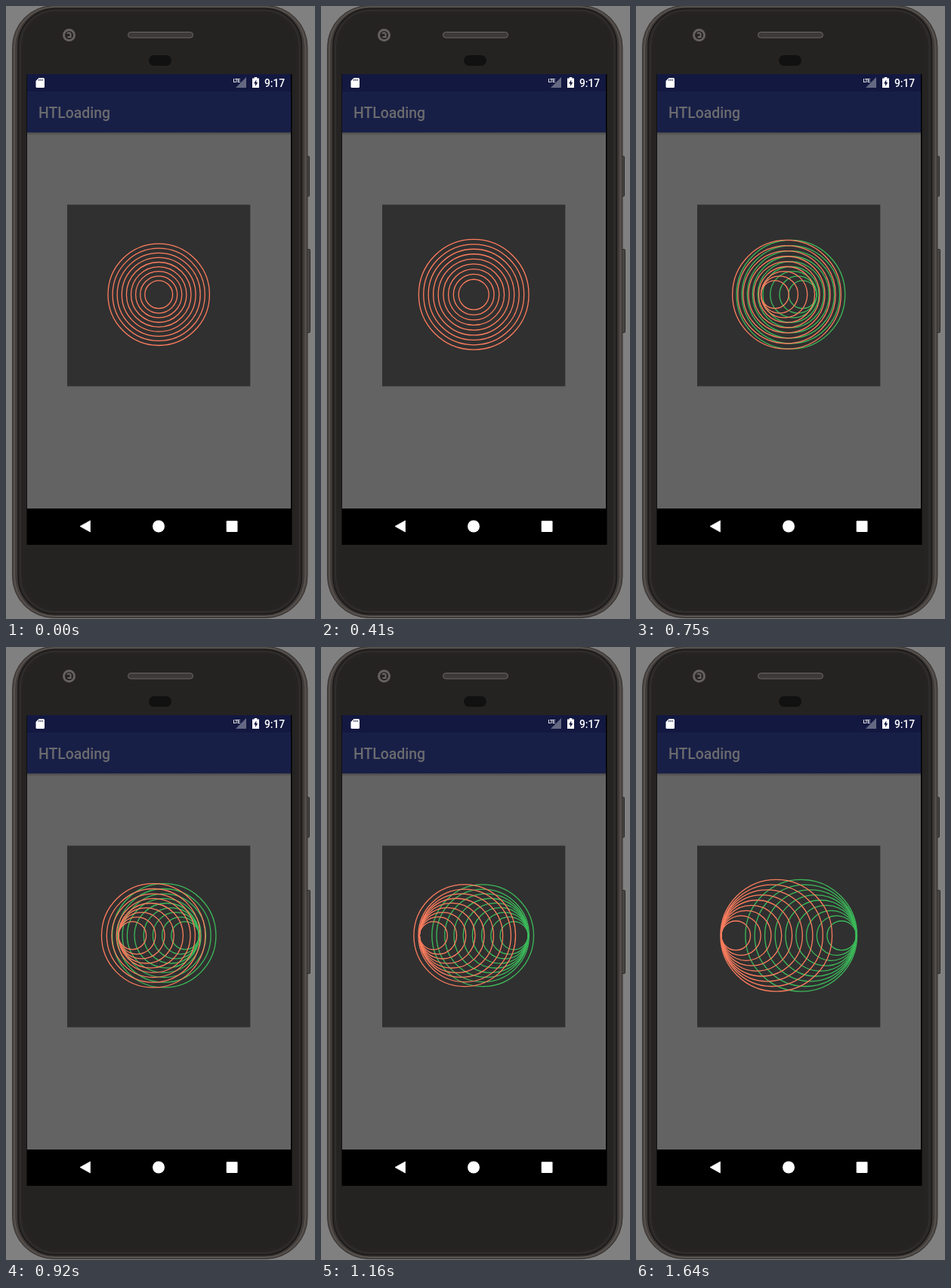
Animation of 409x810 px, one loop 1.74 s. Source, as an HTML page:

```html
<!DOCTYPE html>
<html lang="en">
<head>
<meta charset="utf-8">
<style>
html, body { margin: 0; width: 100%; height: 100%; overflow: hidden; background: #808080; }
svg { display: block; width: 409px; height: 810px; }
text { font-family: Roboto, sans-serif; font-weight: 500; }
</style>
</head>
<body>
<svg viewBox="0 0 409 810">
  <defs>
    <linearGradient id="shade" x2="0" y2="1">
      <stop stop-color="#484848"/><stop offset="1" stop-color="#646464"/>
    </linearGradient>
  </defs>

  <!-- phone body -->
  <g fill="#4b4744" stroke="#292725">
    <rect x="396.5" y="198.5" width="5" height="53" rx="1"/>
    <rect x="397.5" y="321.5" width="5" height="110" rx="1"/>
  </g>
  <rect x="8.5" y="-.5" width="390.5" height="809" rx="55" fill="#4d4845" stroke="#35312f"/>
  <rect x="11.5" y="1" width="384.500" height="805.500" rx="53" fill="#3f3b38" stroke="#69635e" stroke-width=".8"/>
  <rect x="16" y="3.500" width="375.500" height="800" rx="49" fill="#2b2827" stroke="#1b1918" stroke-width="1.500"/>
  <rect x="19.500" y="6" width="368.500" height="794.500" rx="46" fill="#262423" stroke="#35322f"/>
  <rect x="24" y="10" width="359" height="786" rx="42" fill="#252322"/>
  <circle cx="83.500" cy="38.500" r="7" fill="#252423" stroke="#65615e" stroke-width="3"/>
  <path d="M81 36.500q2.500-2.500 4.500 0v4.500h-4" fill="none" stroke="#6b6865" stroke-width="2"/>
  <rect x="161.500" y="34.500" width="86" height="7.500" rx="3.700" fill="#3c3a38" stroke="#6b6763"/>
  <rect x="189" y="65" width="30" height="14" rx="7" fill="#111"/>

  <!-- screen -->
  <path fill="#000" d="M27.500 90h351v622h-351z"/>
  <path fill="#636363" d="M28 113h349v551H28z"/>
  <path fill="#121840" d="M28 90h349v23H28z"/>
  <path fill="#181f47" d="M28 113h349v54H28z"/>
  <path fill="url(#shade)" d="M28 167h349v4H28z"/>
  <text x="43" y="148" font-size="19.400" fill="#6b6b6e">HTLoading</text>
  <g fill="#fff">
    <path d="M43.500 95h6q1.500 0 1.500 1.500v10q0 1.500-1.500 1.500h-8.500q-1.500 0-1.500-1.500V99z"/>
    <path d="M43.700 96.500v2.500m2.200-2.500v2.500m2.200-2.500v2.500" stroke="#121840" stroke-width=".9"/>
    <text x="300.500" y="101" font-size="7.200" font-weight="700" letter-spacing="-.9">LTE</text>
    <path d="M318 94v14h-14z" fill="#646882"/>
    <path d="M326 95.500h2.700V94h3.600v1.500h2.700V108h-9z"/>
    <path d="M331.300 97.500l-3.300 5h2v3.500l3.300-5h-2z" fill="#121840"/>
    <text x="342" y="106.800" font-size="13.800">9:17</text>
    <path d="M98 687.500l13.500-7.500v15z" stroke="#fff" stroke-width=".7" stroke-linejoin="round"/>
    <circle cx="202" cy="687.500" r="8"/>
    <rect x="291.700" y="680.200" width="14.800" height="14.800" rx="1"/>
  </g>

  <path fill="#303030" d="M81 262.600h242.300v240H81z"/>
  <g id="rings" fill="none" stroke-width="1.300"></g>
</svg>
<script>
const LOOP = 1740, STEP = 58, LAST = 28, COUNT = 9;
const rings = document.getElementById("rings");

function addRings(color, side) {
  return Array.from({ length: COUNT }, (_, i) => {
    const el = document.createElementNS("http://www.w3.org/2000/svg", "circle");
    el.setAttribute("cy", 381.3);
    el.setAttribute("stroke", color);
    rings.append(el);
    return { el, i, side };
  });
}
const all = [...addRings("#3cba5a", 1), ...addRings("#fc7d5e", -1)];

// Each ring swells by a tenth; outer rings take longer.
function radius(t, i) {
  const phase = (t % 1110) / (680 + 52 * i);
  const swell = phase < 1 ? 0.05 * (1 - Math.cos(2 * Math.PI * phase)) : 0;
  return (18.4 + 6.1 * i) * (1 + swell);
}

function easeOut(t, start, end) {
  const u = Math.min(1, Math.max(0, (t - start) / (end - start)));
  return Math.sin(u * Math.PI / 2);
}

// The inner ring leads; the others line up with its edge or drift with the outermost.
function slide(t, i) {
  const lead = 70 * easeOut(t, 575, 1635);
  const drift = 16.5 * easeOut(t, 650, 1635);
  return Math.max(drift, lead - radius(t, i) + radius(t, 0));
}

function draw(now) {
  const t = STEP * Math.min(LAST, Math.floor((now % LOOP + 10) / STEP));
  for (const { el, i, side } of all) {
    const shift = slide(t, i);
    el.setAttribute("r", radius(t, i));
    el.setAttribute("cx", 202.2 + side * shift);
    el.setAttribute("visibility", side > 0 && !shift ? "hidden" : "visible");
  }
  requestAnimationFrame(() => draw(performance.now()));
}
draw(0);
</script>
</body>
</html>
```
